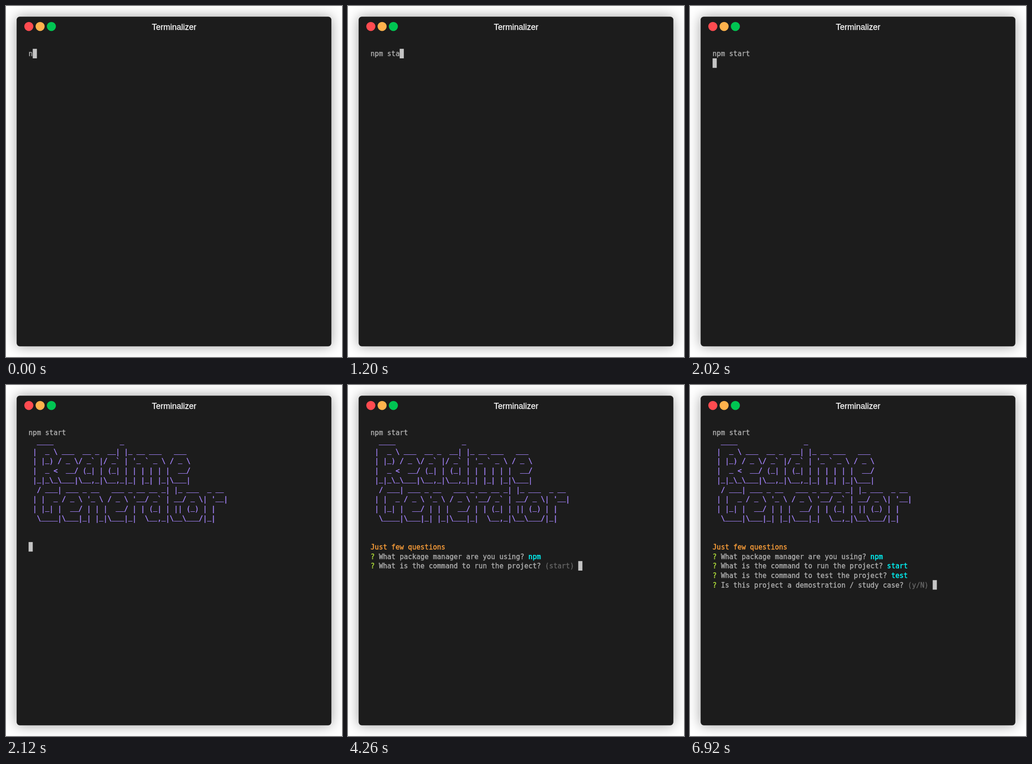
An HTML page with a canvas that plays this animation: 733 by 764 pixels, repeating every 8 s.

```html
<!DOCTYPE html>
<html lang="en">
<head>
<meta charset="utf-8">
<title>Terminal session</title>
<style>
  html, body { margin: 0; width: 100%; height: 100%; overflow: hidden; background: #fff; }
  canvas { display: block; }
</style>
</head>
<body>
<canvas id="stage" width="733" height="764"></canvas>
<script>
const ctx = document.getElementById('stage').getContext('2d');

const LOOP = 8000;
const CELL = { x: 49.3, y: 93.2, w: 9.06, h: 20.72, base: 16 };
const UNDERSCORE_LIFT = 3;
const COLOR = {
  back: '#1c1c1c', text: '#afafaf', cursor: '#c4c4c4', dim: '#666666',
  banner: '#a685ff', orange: '#ffa03a', green: '#b3e33b', cyan: '#00fdff'
};

const BANNER = String.raw`
  ____                _
 |  _ \ ___  __ _  __| |_ __ ___   ___
 | |_) / _ \/ _${'`'} |/ _${'`'} | '_ ${'`'} _ \ / _ \
 |  _ <  __/ (_| | (_| | | | | | |  __/
 |_|_\_\___|\__,_|\__,_|_| |_| |_|\___|
  / ___| ___ _ __   ___ _ __ __ _| |_ ___  _ __
 | |  _ / _ \ '_ \ / _ \ '__/ _${'`'} | __/ _ \| '__|
 | |_| |  __/ | | |  __/ | | (_| | || (_) | |
  \____|\___|_| |_|\___|_|  \__,_|\__\___/|_|`.split('\n').slice(1);

// A line is a list of [text, color] spans.
const line = (text, color = 'text') => [[text, color]];
const ask = (question, reply, color) =>
  [['? ', 'green'], [question + ' ', 'text'], [reply, color]];

const COMMAND = 'npm start';
const PACKAGE = 'What package manager are you using?';
const RUN = 'What is the command to run the project?';
const TEST = 'What is the command to test the project?';
const STUDY = 'Is this project a demostration / study case?';

const banner = [line(COMMAND), ...BANNER.map(row => line(row, 'banner')), [], []];
const intro = [...banner, line('Just few questions', 'orange')];
const pkgDone = [...intro, ask(PACKAGE, 'npm', 'cyan')];
const runDone = [...pkgDone, ask(RUN, 'start', 'cyan')];
const testDone = [...runDone, ask(TEST, 'test', 'cyan')];

const screens = [0, 210, 360, 500, 740, 990, 1200, 1430, 1580].map((at, i) =>
  ({ at, lines: [line(COMMAND.slice(0, i + 1))], cursor: true }));

screens.push(
  { at: 2020, lines: [line(COMMAND), []], cursor: true },
  { at: 2120, lines: [...banner, []], cursor: true },
  { at: 2190, lines: [...intro, []], cursor: true },
  { at: 2260, lines: [
    ...intro,
    ask(PACKAGE, '(Use arrow keys)', 'dim'),
    line('❯ npm', 'cyan'),
    line('  yarn')
  ] },
  { at: 4260, lines: [...pkgDone, ask(RUN, '(start) ', 'dim')], cursor: true },
  { at: 5170, lines: [...runDone, ask(TEST, '(test) ', 'dim')], cursor: true },
  { at: 6920, lines: [...testDone, ask(STUDY, '(y/N) ', 'dim')], cursor: true }
);

// A hairline outline gives the type a slightly heavier weight.
function drawText(text, x, y, color, outline) {
  ctx.fillStyle = ctx.strokeStyle = color;
  ctx.lineWidth = outline;
  ctx.fillText(text, x, y);
  ctx.strokeText(text, x, y);
}

function drawWindow() {
  ctx.fillStyle = '#fff';
  ctx.fillRect(0, 0, 733, 764);

  ctx.save();
  ctx.shadowColor = 'rgba(0, 0, 0, 0.38)';
  ctx.shadowBlur = 28;
  ctx.fillStyle = COLOR.back;
  ctx.beginPath();
  ctx.roundRect(23.2, 23.2, 686.6, 717.6, 7);
  ctx.fill();
  ctx.restore();

  ['#ff4b50', '#ffb24c', '#00c552'].forEach((color, i) => {
    ctx.fillStyle = color;
    ctx.beginPath();
    ctx.arc(49.8 + i * 24.6, 44.6, 9.9, 0, Math.PI * 2);
    ctx.fill();
  });

  ctx.font = '18px "Liberation Sans", Arial, sans-serif';
  ctx.textAlign = 'center';
  drawText('Terminalizer', 366.7, 51.8, '#fff', 0.3);
}

// Draws one line on the grid and returns the column after it.
function drawLine(spans, row) {
  let col = 0;
  const y = CELL.y + row * CELL.h + CELL.base;
  for (const [text, color] of spans) {
    for (const char of text) {
      const lift = char === '_' ? UNDERSCORE_LIFT : 0;
      drawText(char, CELL.x + col * CELL.w, y - lift, COLOR[color], 0.4);
      col++;
    }
  }
  return col;
}

function drawScreen({ lines, cursor }) {
  ctx.font = '15px "DejaVu Sans Mono", "DejaVu Sans", monospace';
  ctx.textAlign = 'left';
  let col = 0;
  lines.forEach((spans, row) => { col = drawLine(spans, row); });
  if (cursor) {
    ctx.fillStyle = COLOR.cursor;
    ctx.fillRect(CELL.x + col * CELL.w, CELL.y + (lines.length - 1) * CELL.h, CELL.w, CELL.h);
  }
}

const start = performance.now();

function render() {
  const time = (performance.now() - start) % LOOP;
  drawWindow();
  drawScreen(screens.findLast(screen => screen.at <= time));
  requestAnimationFrame(render);
}

render();
</script>
</body>
</html>
```
